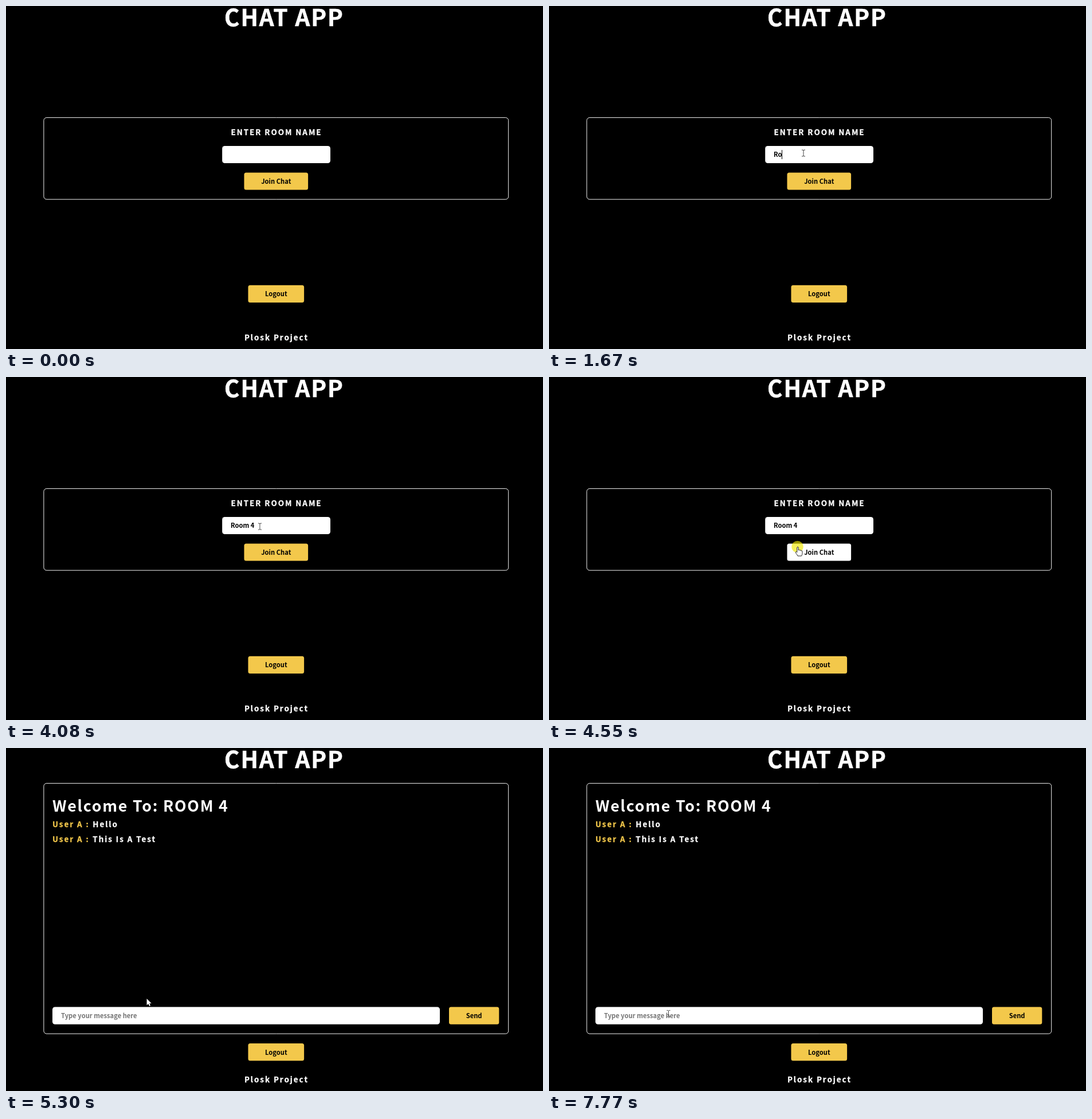
An HTML page with a canvas for the animation above (8 s loop, 937 by 598 pixels).

```html
<!DOCTYPE html>
<html lang="en">
<head>
<meta charset="utf-8">
<title>Chat app</title>
<style>
  html, body { margin: 0; width: 100%; height: 100%; overflow: hidden; background: #000; }
  canvas { display: block; }
</style>
</head>
<body>
<canvas id="stage" width="937" height="598"></canvas>
<script>
const ctx = document.getElementById('stage').getContext('2d');
const LOOP = 8000, GOLD = '#f3c84b', GREY = '#757575';
const FAMILY = '"Noto Sans CJK JP", "Noto Sans CJK SC", "Noto Sans CJK KR", "Noto Sans CJK", sans-serif';
const CAP_RATIO = 1.117; // this family draws its Latin letters large for the em

const mix = (a, b, p) => a + (b - a) * p;
const clamp = v => Math.max(0, Math.min(1, v));
const within = (t, from, to) => t >= from && t < to;
const ease = p => p * p * (3 - 2 * p);

function setFont(size, spacing) {
  ctx.font = `700 ${size / CAP_RATIO}px ${FAMILY}`;
  ctx.letterSpacing = spacing + 'px';
}

function text(str, x, y, { size = 12.5, spacing = 0, color = '#000', align = 'left', heavy = 0 } = {}) {
  setFont(size, spacing);
  ctx.textAlign = align;
  ctx.fillStyle = ctx.strokeStyle = color;
  ctx.fillText(str, x, y);
  if (heavy) {
    ctx.lineWidth = heavy;
    ctx.lineJoin = 'miter';
    ctx.strokeText(str, x, y);
  }
}

const heading = (str, x, y, options) =>
  text(str, x, y, { size: 15, spacing: 1.95, color: '#fff', heavy: 0.3, ...options });

function box(x, y, w, h, color, radius = 4) {
  ctx.beginPath();
  ctx.roundRect(x, y, w, h, radius);
  ctx.fillStyle = color;
  ctx.fill();
}

function button(label, x, y, w, color = GOLD) {
  box(x, y, w, 30.2, color, 3.5);
  text(label, x + w / 2, y + 19.6, { align: 'center' });
}

function panel(y, h) {
  ctx.beginPath();
  ctx.roundRect(65.9, y, 810.8, h, 5);
  ctx.strokeStyle = '#fff';
  ctx.lineWidth = 0.95;
  ctx.stroke();
}

function caret(x, y) {
  ctx.fillStyle = '#000';
  ctx.fillRect(x, y, 1, 16);
}

const ARROW = new Path2D('M0 0V11.5L2.7 9L4.6 13L6.4 12.2L4.6 8.3H8.2Z');
const HAND = new Path2D('M-1.2 1Q0 -1.2 1.2 1V6Q2.6 4.6 3.7 6.2Q5.2 5.2 6.1 6.8Q8 6.2 8 8.4V11.5Q8 13.5 6.5 16H0Q-1 13.5 -3.6 10.6Q-4.4 8.8 -2.6 8.6L-1.2 9.8Z');
const IBEAM = new Path2D('M-3 -5.5H-1L0 -4.8L1 -5.5H3M0 -4.8V4.8M-3 5.5H-1L0 4.8L1 5.5H3');

function pointer(shape, x, y) {
  ctx.save();
  ctx.translate(x, y);
  ctx.lineWidth = 1;
  ctx.strokeStyle = shape === IBEAM ? '#444' : '#222';
  if (shape !== IBEAM) {
    ctx.fillStyle = '#fff';
    ctx.fill(shape);
  }
  if (shape !== ARROW) ctx.stroke(shape);
  ctx.restore();
}

function clickMark(x, y, alpha = 0.65) {
  ctx.beginPath();
  ctx.arc(x, y, 10.3, 0, 7);
  ctx.fillStyle = `rgba(240,232,0,${alpha})`;
  ctx.fill();
}

// Progress that advances in equal jumps, as a screen capture does
const stepped = (t, start, gap, count) => clamp(Math.floor((t - start) / gap) / count);

const KEY_TIMES = [1470, 1670, 2000, 2270, 2530, 3090];

function joinScreen(t) {
  const typed = 'Room 4'.slice(0, KEY_TIMES.filter(k => t >= k).length);
  const glide = t < 4020 ? 0 : ease(stepped(t + 75, 4020, 75, 5));
  const hover = clamp((t - 4290) / 150);

  panel(194.6, 142.5);
  heading('ENTER ROOM NAME', 472, 225, { align: 'center' });
  box(377.2, 244, 188.8, 30, '#fff', 4.5);
  text(typed, 392, 263.4);
  button('Join Chat', 415.5, 290.4, 111.6,
    `rgb(${mix(243, 255, hover)},${mix(200, 255, hover)},${mix(75, 255, hover)})`);
  button('Logout', 422.5, 486.8, 97.6);

  const focused = within(t, 650, 1140) || within(t, 1470, 3000) ||
    within(t, 3090, 3620) || within(t, 4120, 4470);
  if (focused) {
    setFont(12.5, 0);
    caret(Math.floor(392.4 + ctx.measureText(typed).width), 251);
  }

  if (t < 120) return;
  if (t < 250) {
    const p = stepped(t, 120, 65, 2);
    pointer(ARROW, mix(690, 444, p), mix(482, 256, p));
    return;
  }
  const x = mix(444, 434, glide), y = mix(256.5, 296, glide);
  if (within(t, 580, 740)) clickMark(443, 256, t < 650 ? 0.65 : 0.4);
  if (t >= 4470) clickMark(433.5, 296);
  pointer(y < 274 ? IBEAM : y < 290 ? ARROW : HAND, x, y);
}

function message(str, y) {
  heading('User A :', 81, y, { color: GOLD });
  heading(str, 151.3, y);
}

function chatScreen(t) {
  panel(61.6, 436.6);
  heading('Welcome To: ROOM 4', 81, 111, { size: 30, spacing: 1.7, heavy: 0 });
  if (t >= 4890) {
    message('Hello', 138);
    message('This Is A Test', 164);
  }
  box(81, 451.5, 676, 30.2, '#fff', 4.5);
  text('Type your message here', 96, 470.8, { color: GREY });
  button('Send', 773, 451.5, 87.3);
  button('Logout', 422.5, 515, 97.6);

  if (within(t, 7340, 7770)) caret(96, 458);
  if (within(t, 7240, 7440)) clickMark(208, 462, t < 7340 ? 0.65 : 0.4);

  const glide = ease(stepped(t, 4890, 68, 8));
  const restX = t < 6450 ? 210.7 : t < 6710 ? 209.6 : 208.5;
  const x = mix(434, restX, glide), y = mix(296, 463, glide);
  pointer(y < 452 ? ARROW : IBEAM, x, y);
}

function draw(now) {
  const t = now % LOOP;
  ctx.fillStyle = '#000';
  ctx.fillRect(0, 0, 937, 598);
  heading('CHAT APP', 485.4, 35.4, { size: 45, spacing: 1.9, align: 'center', heavy: 0.6 });
  heading('Plosk Project', 472, 582.7, { align: 'center' });
  (t < 4620 ? joinScreen : chatScreen)(t);
  requestAnimationFrame(draw);
}

requestAnimationFrame(draw);
</script>
</body>
</html>
```
